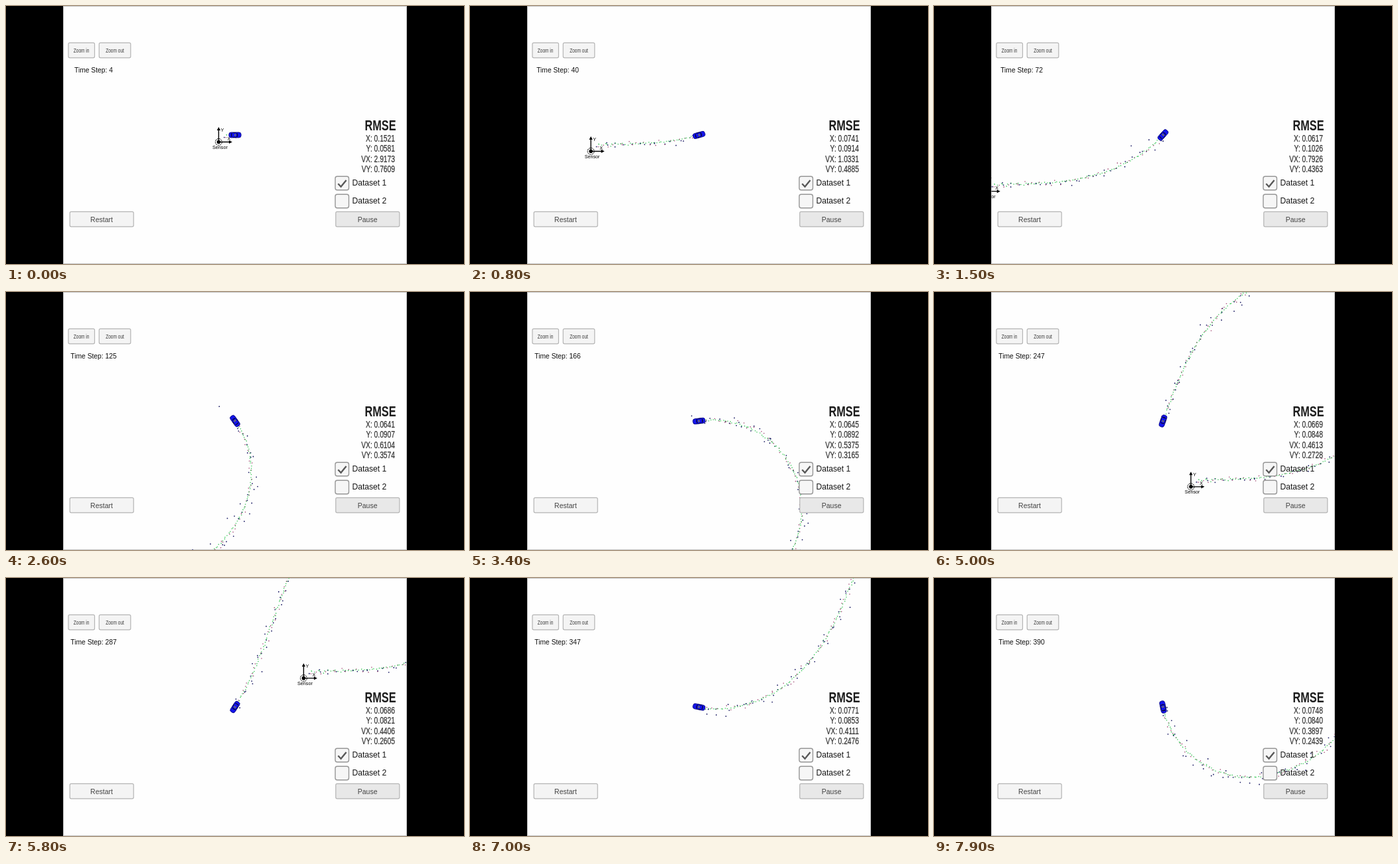
These frames come from a looping animation (690x388 px, 8 s). An HTML page:

```html
<!DOCTYPE html>
<html lang="en">
<head>
<meta charset="utf-8">
<title>Tracking simulator</title>
<style>
  html, body { margin: 0; width: 100%; height: 100%; overflow: hidden; background: #000; }
  svg { display: block; font-family: "Liberation Sans", Arial, sans-serif; }
  .button { stroke: #b4b4b4; stroke-width: 1.2; fill: #f4f4f4; }
  .label { font-size: 10.5px; fill: #444; text-anchor: middle; }
  .narrow { font-size: 9px; fill: #3c3c3c; text-anchor: middle; }
  .box { fill: #f6f6f6; stroke: #969696; stroke-width: 1.4; }
  .option { font-size: 12.15px; fill: #161616; }
  .score { font-size: 13.8px; fill: #333; stroke: #333; stroke-width: .25; text-anchor: end; }
  .dots { fill: none; stroke-linecap: round; }
</style>
</head>
<body>
<svg width="690" height="388" viewBox="0 0 690 388">
  <defs><clipPath id="page"><rect x="86.5" width="517" height="388"/></clipPath></defs>
  <rect width="690" height="388" fill="#000"/>
  <rect x="86.5" y=".5" width="517" height="387" fill="#fefefe" stroke="#c4c4c4"/>

  <g clip-path="url(#page)">
    <g id="world">
      <g id="sensor">
        <circle r="5" fill="#fff" stroke="#111" stroke-width="1" stroke-dasharray="2.6 .7"/>
        <path d="M0 0V-18M0 0H16" stroke="#000" stroke-width="1.4"/>
        <path d="M-2.6-17.5L0-22.5 2.6-17.5ZM15.5-2.6L20.5 0 15.5 2.6Z"/>
        <circle r="2.8"/>
        <g font-size="7.2" text-anchor="middle">
          <text x="5.5" y="-15.5">Y</text>
          <text x="15.5" y="-2.8">X</text>
          <text x="2" y="10.3">Sensor</text>
        </g>
      </g>
      <path id="radar" class="dots" stroke="#1c1c64" stroke-width="1.8"/>
      <path id="lidar" class="dots" stroke="#a04470" stroke-width="1.6"/>
      <path id="estimate" class="dots" stroke="#3cc85a" stroke-width="1.6"/>
    </g>
    <g id="car">
      <rect x="-9.2" y="-4" width="18.4" height="8" rx="3.2" fill="#1414ea" stroke="#0a0a80" stroke-width=".8"/>
      <path d="M2.6-2.9Q4.8 0 2.6 2.9M-4.8-2.8Q-6.2 0-4.8 2.8" fill="none" stroke="#080830" stroke-width="1.3"/>
      <path d="M-3.2-3.5H1.4M-3.2 3.5H1.4" stroke="#080840"/>
      <rect x="-.8" y="-1.6" width="2" height="3.2" fill="#77775e"/>
    </g>
  </g>

  <rect class="button" x="94" y="55.3" width="39.5" height="22.5" rx="2"/>
  <rect class="button" x="140.3" y="55.3" width="47.5" height="22.5" rx="2"/>
  <text class="narrow" transform="translate(113.6 70.2) scale(.73 1)">Zoom in</text>
  <text class="narrow" transform="translate(164 70.2) scale(.73 1)">Zoom out</text>
  <text id="step" x="132" y="100.3" font-size="10.3" fill="#111" text-anchor="middle"></text>

  <text transform="translate(564 187) scale(.73 1)" font-size="22.3" font-weight="bold" fill="#1c1c1c" text-anchor="middle">RMSE</text>
  <g id="scores"></g>

  <rect class="box" x="496" y="256.2" width="20.5" height="20.5" rx="3"/>
  <rect class="box" x="496" y="283.2" width="20.5" height="20.5" rx="3"/>
  <path d="M500.3 267.2L504.6 271.8 512.6 262" fill="none" stroke="#585858" stroke-width="2.3"/>
  <text class="option" x="521.4" y="270.2">Dataset 1</text>
  <text class="option" x="521.4" y="297.2">Dataset 2</text>

  <rect class="button" x="96.2" y="309.4" width="96" height="22.4" rx="2"/>
  <rect class="button" x="496.8" y="309.4" width="96" height="22.4" rx="2" style="fill:#e8e8e8"/>
  <text class="label" x="144" y="324.7">Restart</text>
  <text class="label" x="544.6" y="324.7">Pause</text>
</svg>
<script>
const LOOP = 8000, TICK = 100, LAST = 395;
const SCALE = 15, DT = 0.05, CENTER = { x: 345, y: 194 };
const times = [0, 1500, 2600, 4200, 5800, 7000, 7900];
const steps = [4, 72, 125, 207, 287, 347, 390];
const scores = {
  X: [.1521, .0617, .0641, .0649, .0686, .0771, .0748],
  Y: [.0581, .1026, .0907, .0880, .0821, .0853, .0840],
  VX: [2.9173, .7926, .6104, .4869, .4406, .4111, .3897],
  VY: [.7609, .4363, .3574, .2880, .2605, .2476, .2439]
};
const $ = id => document.getElementById(id);

let seed = 20177;
function random() {
  seed = (seed * 16807) % 2147483647;
  return seed / 2147483647;
}
const gauss = () => Math.sqrt(-2 * Math.log(random())) * Math.cos(2 * Math.PI * random());

// Figure eight: sinusoidal yaw rate, gently varying speed.
const phase = n => 2 * Math.PI * n / 500;
const heading = n => 0.55 * DT * 500 / (2 * Math.PI) * (1 - Math.cos(phase(n)));
const speed = n => 5 + 0.2 * Math.cos(2 * phase(n));

const track = [{ x: 0.6, y: 0.7 }];
for (let n = 0; n < LAST; n++) {
  const p = track[n], d = speed(n + .5) * DT, a = heading(n + .5);
  track.push({ x: p.x + d * Math.cos(a), y: p.y + d * Math.sin(a) });
}

const dot = (x, y) => `M${(x * SCALE).toFixed(1)} ${(-y * SCALE).toFixed(1)}h.01`;
const estimates = [], lidars = [], radars = [];
track.forEach((p, n) => {
  const drift = n < 6 ? .1 : .045;
  estimates.push(dot(p.x + drift * gauss(), p.y + drift * gauss()));
  if (n % 2) {
    const range = Math.hypot(p.x, p.y) + .3 * gauss();
    const angle = Math.atan2(p.y, p.x) + .03 * gauss();
    radars.push(dot(range * Math.cos(angle), range * Math.sin(angle)));
  } else {
    lidars.push(dot(p.x + .15 * gauss(), p.y + .15 * gauss()));
  }
});

const scoreTexts = Object.keys(scores).map((name, i) => {
  const text = document.createElementNS("http://www.w3.org/2000/svg", "text");
  text.setAttribute("class", "score");
  text.setAttribute("transform", `translate(586 ${[203.6, 219, 235, 250][i]}) scale(.745 1)`);
  $("scores").append(text);
  return { name, text };
});

function interpolate(xs, ys, x) {
  let i = 0;
  while (i < xs.length - 2 && x > xs[i + 1]) i++;
  return ys[i] + (ys[i + 1] - ys[i]) * (x - xs[i]) / (xs[i + 1] - xs[i]);
}
const logSteps = steps.map(Math.log);
const scoreAt = (name, n) =>
  Math.exp(interpolate(logSteps, scores[name].map(Math.log), Math.log(n)));

function draw(time) {
  const n = Math.round(interpolate(times, steps, Math.floor(time / TICK) * TICK));
  const p = track[n];
  $("world").setAttribute("transform",
    `translate(${CENTER.x - p.x * SCALE} ${CENTER.y + p.y * SCALE})`);
  $("car").setAttribute("transform",
    `translate(${CENTER.x} ${CENTER.y}) rotate(${-heading(n) * 180 / Math.PI})`);
  $("estimate").setAttribute("d", estimates.slice(0, n + 1).join(""));
  $("lidar").setAttribute("d", lidars.slice(0, (n >> 1) + 1).join(""));
  $("radar").setAttribute("d", radars.slice(0, (n + 1) >> 1).join(""));
  $("step").textContent = `Time Step: ${n}`;
  for (const { name, text } of scoreTexts)
    text.textContent = `${name}: ${scoreAt(name, n).toFixed(4)}`;
}

const start = performance.now();
function frame() {
  draw((performance.now() - start) % LOOP);
  requestAnimationFrame(frame);
}
frame();
</script>
</body>
</html>
```
